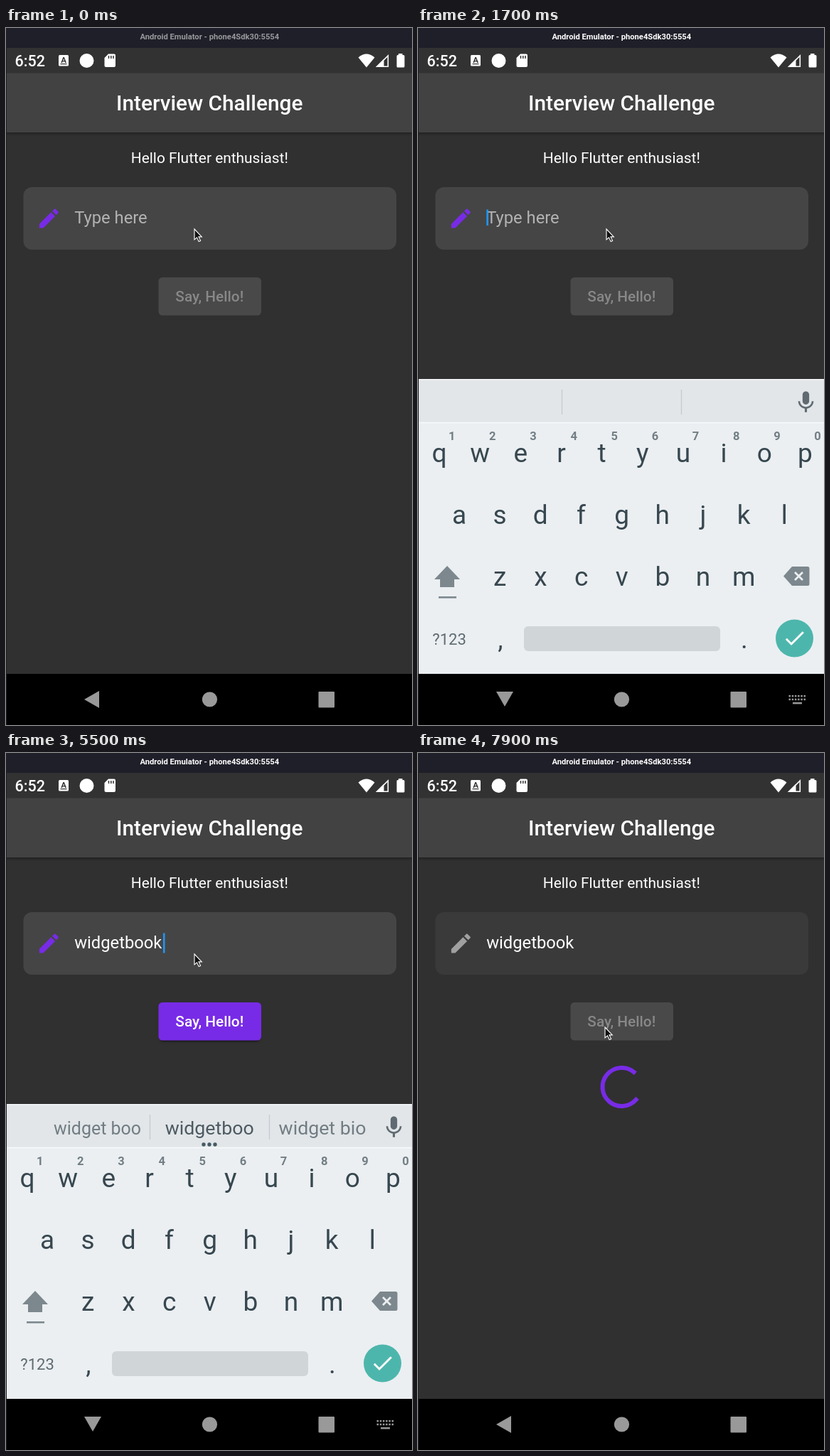
Recreate the animation shown at these times as an HTML page. Size 571x981 px, loop 8 s.

```html
<!DOCTYPE html>
<html lang="en">
<head>
<meta charset="utf-8">
<title>Interview Challenge</title>
<style>
html, body { margin: 0; width: 100%; height: 100%; overflow: hidden; background: #303030; }
svg { display: block; width: 571px; height: 981px; font-family: Roboto, sans-serif; }
.mid { text-anchor: middle; }
.med { font-weight: 500; }
</style>
</head>
<body>
<svg viewBox="0 0 571 981" xmlns="http://www.w3.org/2000/svg">
  <defs>
    <linearGradient id="shade" x2="0" y2="1">
      <stop stop-opacity=".3"/><stop offset="1" stop-opacity="0"/>
    </linearGradient>
    <clipPath id="btnClip"><rect x="214.5" y="351" width="144.5" height="53.5" rx="5.5"/></clipPath>
    <filter id="soft" x="-40%" y="-40%" width="180%" height="180%">
      <feDropShadow dx="0" dy="1.5" stdDeviation="1.5" flood-opacity=".3"/>
    </filter>
  </defs>

  <rect width="571" height="981" fill="#303030"/>

  <!-- window title -->
  <rect width="571" height="28" fill="#1f1f29"/>
  <text id="winTitle" class="mid" x="286.3" y="15.5" font-size="11.2" font-weight="700">Android Emulator - phone4Sdk30:5554</text>

  <!-- status bar -->
  <rect y="28" width="571" height="36" fill="#323232"/>
  <g fill="#fff">
    <text class="med" x="12.5" y="54" font-size="21.5">6:52</text>
    <rect x="74" y="38" width="14" height="15.5" rx="1.5"/>
    <text class="mid" x="81" y="48.5" font-size="11.5" font-weight="700" fill="#323232">A</text>
    <rect x="76.5" y="50" width="9" height="1.2" fill="#323232"/>
    <circle cx="113.5" cy="46" r="10"/>
    <path d="M144 36.5H152Q154 36.5 154 38.5V53Q154 55 152 55H140.5Q138.5 55 138.5 53V42Z"/>
    <path d="M144.5 39V43M147.8 39V43M151 39V43" stroke="#323232" stroke-width="1.5"/>
    <path d="M507 55.5L495.5 41.5Q507 31.5 518.5 41.5Z"/>
    <path d="M520 55L531.5 43.5V55Z"/>
    <path d="M522 54.2H537.3V39Z" fill="none" stroke="#fff" stroke-width="1.6"/>
    <path d="M552 36H557.5V38H559Q560.5 38 560.5 39.5V54Q560.5 55.5 559 55.5H551Q549.5 55.5 549.5 54V39.5Q549.5 38 551 38H552Z"/>
  </g>

  <!-- app bar -->
  <rect y="63.5" width="571" height="83.5" fill="#424242"/>
  <rect y="147" width="571" height="5" fill="url(#shade)"/>
  <text class="mid med" x="286.2" y="116.3" font-size="29.8" fill="#fff">Interview Challenge</text>
  <text class="mid" x="286.3" y="190.3" font-size="20.9" fill="#fff">Hello Flutter enthusiast!</text>

  <!-- input -->
  <rect id="field" x="24.5" y="224" width="524.5" height="88" rx="12"/>
  <path id="pencil" transform="translate(42.3 250) scale(1.5)" d="M3 17.25V21h3.75L17.81 9.94l-3.75-3.75L3 17.25zM20.71 7.04c.39-.39.39-1.02 0-1.41l-2.34-2.34c-.39-.39-1.02-.39-1.41 0l-1.83 1.83 3.75 3.75 1.83-1.83z"/>
  <text id="input" x="96.2" y="275" font-size="23.75"></text>
  <rect id="caret" width="2.6" fill="#2196f3"/>

  <!-- button -->
  <rect id="btnShadow" x="216" y="354" width="141.5" height="52.5" rx="5.5" fill="#000" filter="url(#soft)"/>
  <rect id="btn" x="214.5" y="351" width="144.5" height="53.5" rx="5.5"/>
  <text id="btnText" class="mid med" x="286.3" y="385.3" font-size="20.8">Say, Hello!</text>
  <g clip-path="url(#btnClip)"><circle id="ripple" cx="275" cy="381" fill="#fff"/></g>

  <path id="spinner" fill="none" stroke="#782be6" stroke-width="6" stroke-linecap="square"/>

  <!-- keyboard -->
  <g id="board">
    <rect y="494" width="571" height="491" fill="#ebeff2"/>
    <rect y="494" width="571" height="61" fill="#e2e6e9"/>
    <path d="M0 494.7H571M0 555.5H571" stroke="#f7f9fa" stroke-width="1.5"/>
    <path d="M202.5 509V544M370.5 509V544" stroke="#c6cbce" stroke-width="1.3"/>
    <g id="words" class="mid" font-size="26.7"></g>
    <g id="dots" fill="#455a64">
      <circle cx="278" cy="551" r="2.7"/><circle cx="286" cy="551" r="2.7"/><circle cx="294" cy="551" r="2.7"/>
    </g>
    <path transform="translate(526.9 508.3) scale(1.55)" fill="#5f6b71" d="M12 14c1.66 0 3-1.34 3-3V5c0-1.66-1.34-3-3-3S9 3.34 9 5v6c0 1.66 1.34 3 3 3zm5.3-3c0 3-2.54 5.1-5.3 5.1S6.7 14 6.7 11H5c0 3.41 2.72 6.23 6 6.72V21h2v-3.28c3.28-.48 6-3.3 6-6.72h-1.7z"/>
    <g id="keys" class="mid"></g>
    <g fill="#7c888d">
      <path d="M41 757L59 776H51V787H31V776H23Z"/>
      <rect x="29" y="800" width="25" height="2.6"/>
      <path d="M526 758H548Q550.5 758 550.5 760.5V782.5Q550.5 785 548 785H526L514 771.5Z"/>
    </g>
    <path d="M530 766L541 777M541 766L530 777" stroke="#ebeff2" stroke-width="2.8"/>
    <rect x="149" y="842" width="276" height="35" rx="6" fill="#d0d5d8"/>
    <circle cx="529.5" cy="859" r="26.5" fill="#4db6ac"/>
    <path transform="translate(511.7 840.9) scale(1.484)" fill="#fff" d="M9 16.17L4.83 12l-1.42 1.41L9 19 21 7l-1.41-1.41z"/>
  </g>

  <!-- navigation -->
  <rect id="navBack" y="909" width="571" height="72" fill="#000"/>
  <g id="nav">
    <path id="back" d="M-12 0L9 -12V12Z"/>
    <circle cx="286.5" cy="945" r="10.6"/>
    <rect x="439.5" y="934" width="22.5" height="22.5" rx="1"/>
    <path id="boardIcon"/>
  </g>

  <rect y="28" width="1" height="953" fill="#1c1d24"/>
  <path id="pointer" d="M0 0V14.8L3.5 11.8L6.2 17.5L8.6 16.4L6 10.9H10.3Z" fill="#111" stroke="#fff" stroke-width="1.1"/>
</svg>
<script>
const LOOP = 8000, STEP = 100, KEYBOARD = 486;
const $ = id => document.getElementById(id);
const set = (el, attrs) => { for (const k in attrs) el.setAttribute(k, attrs[k]); };
const clamp = x => Math.min(1, Math.max(0, x));
const smooth = x => (x = clamp(x), x * x * (3 - 2 * x));
const mix = (a, b, k) => `rgb(${a.map((v, i) => Math.round(v + (b[i] - v) * k))})`;
const last = (list, t) => list.filter(e => e[0] <= t).pop();

function add(parent, text, attrs) {
  const el = document.createElementNS('http://www.w3.org/2000/svg', 'text');
  el.textContent = text;
  set(el, attrs);
  parent.appendChild(el);
  return el;
}

// Time of each keystroke and number of letters typed
const WORD = 'widgetbook';
const typed = [[0, 0], [2000, 1], [2100, 2], [2700, 3], [3000, 4], [3200, 5],
  [3600, 6], [4200, 7], [4900, 8], [5100, 9], [5500, 10]];

// Suggestions: time, left, middle, right, then condensing of the outer two
const hints = [
  [0, '', '', ''],
  [2100, 'we', 'w', 'with'],
  [2200, 'will', 'wi', 'with'],
  [2800, 'aid', 'wid', 'wide'],
  [3100, 'wide', 'widg', 'widget'],
  [3300, 'wide', 'widge', 'widgets'],
  [3700, 'widgets', 'widget', 'widget\u2019s'],
  [4300, 'widgets', 'widgetb', 'widget'],
  [5000, 'widget bo', 'widgetbo', 'widget by'],
  [5200, 'widget boo', 'widgetboo', 'widget bio', .935, 1],
  [5600, 'widget book', 'widgetbook', 'widget boom', .84, .8]
];
const slotX = [128.5, 286.2, 445];
const slots = slotX.map((x, i) => add($('words'), '', { fill: i === 1 ? '#4c5a61' : '#717d83' }));

const PITCH = 57.15;
[['qwertyuiop', 30, 611], ['asdfghjkl', 58, 698], ['zxcvbnm', 115.3, 785]].forEach(([row, x, y]) =>
  [...row].forEach((c, i) => add($('keys'), c, { x: x + i * PITCH, y, 'font-size': 37, fill: '#37474f' })));
[...'1234567890'].forEach((c, i) =>
  add($('keys'), c, { x: 47.7 + i * PITCH, y: 579.5, 'font-size': 16.5, 'font-weight': 700, fill: '#727e84' }));
add($('keys'), '?123', { x: 44, y: 867.5, 'font-size': 22, fill: '#5f6b71' });
add($('keys'), ',', { x: 116, y: 873, 'font-size': 37, fill: '#37474f' });
add($('keys'), '.', { x: 459, y: 873, 'font-size': 37, fill: '#37474f' });

let icon = 'M527 949h13v2.5h-13z';
for (let i = 0; i < 6; i++)
  for (const y of [939, 943.7]) icon += `M${521.5 + i * 4.2} ${y}h2.5v2.5h-2.5z`;
$('boardIcon').setAttribute('d', icon);

// cubic-bezier(.4, 0, .2, 1)
function fastOutSlowIn(x) {
  x = clamp(x);
  let lo = 0, hi = 1, u = .5;
  for (let i = 0; i < 24; i++) {
    u = (lo + hi) / 2;
    const bx = 1.2 * u * (1 - u) ** 2 + .6 * u * u * (1 - u) + u ** 3;
    if (bx < x) lo = u; else hi = u;
  }
  return u * u * (3 - 2 * u);
}

function arc(ms) {
  const p = ms / 1333 % 1;
  const head = fastOutSlowIn(p * 2), tail = fastOutSlowIn(p * 2 - 1);
  const a = (-90 + tail * 270 + ms / 2222 * 360 + p * 90) * Math.PI / 180;
  const sweep = Math.max((head - tail) * 1.5 * Math.PI, .01);
  const at = r => `${286.5 + 27 * Math.cos(r)} ${470 + 27 * Math.sin(r)}`;
  return `M${at(a)}A27 27 0 ${sweep > Math.PI ? 1 : 0} 1 ${at(a + sweep)}`;
}

function drawInput(t, sent) {
  const n = last(typed, t)[1], input = $('input');
  input.textContent = n ? WORD.slice(0, n) : 'Type here';
  set(input, { fill: n ? '#fff' : '#b3b3b3' });
  set($('field'), { fill: sent ? '#3a3a3a' : '#454545' });
  set($('pencil'), { fill: sent ? '#a0a0a0' : '#782be6' });

  const off = t < 700 || (t >= 1200 && t < 1700) || (t >= 6100 && t < 6600) || t >= 7100;
  set($('caret'), {
    x: n ? 96.8 + input.getBBox().width : 96.3,
    y: n ? 253.5 : 255.5, height: n ? 28 : 22.5,
    visibility: off ? 'hidden' : 'visible'
  });
}

function drawButton(t, sent) {
  const on = sent ? clamp(1 - (t - 7400) / 250) : clamp((t - 1900) / 300);
  const label = sent ? on * .8 : on;
  set($('btn'), { fill: mix([73, 73, 73], [120, 43, 230], on) });
  set($('btnShadow'), { opacity: on * .35 });
  set($('btnText'), { fill: mix([136, 136, 136], [255, 255, 255], label) });
  const age = (t - 7400) / 100;
  set($('ripple'), { r: 54 + Math.max(0, age) * 34, opacity: sent ? .22 * clamp(1 - age / 3) : 0 });
  set($('spinner'), { d: sent ? arc(t - 7325) : '' });
}

function drawKeyboard(t, sent) {
  const shown = sent ? 1 - smooth((t - 7230) / 375) : t < 700 ? 0 : smooth((t - 630) / 375);
  const sliding = (t >= 700 && t < 1000) || (t >= 7400 && t < 7600);
  set($('board'), {
    transform: `translate(0 ${Math.round(KEYBOARD * (1 - shown))})`,
    visibility: shown > .01 ? 'visible' : 'hidden'
  });
  const hint = last(hints, t);
  slots.forEach((el, i) => {
    el.textContent = hint[i + 1];
    const k = i === 1 ? 1 : hint[i ? 5 : 4] || 1;
    set(el, { transform: `translate(${slotX[i]} 537) scale(${k} 1)` });
  });
  set($('dots'), { visibility: shown > .01 && t >= 2100 ? 'visible' : 'hidden' });

  const turn = sent ? 1 - smooth((t - 7310) / 200) : smooth((t - 800) / 200);
  set($('navBack'), { visibility: sliding ? 'hidden' : 'visible' });
  set($('nav'), { fill: sliding ? '#f7f8f8' : '#999', filter: sliding ? 'url(#soft)' : 'none' });
  set($('back'), { transform: `translate(122 ${945 - 2 * turn}) rotate(${-90 * turn})` });
  set($('boardIcon'), { visibility: t >= 800 && !sent ? 'visible' : 'hidden' });
}

function drawPointer(t) {
  const p = smooth((t - 6400) / 840), q = 1 - p;
  const x = 265 * q * q + 144 * p * q + 263 * p * p;
  const y = 283 * q * q + 670 * p * q + 386 * p * p;
  set($('pointer'), { transform: `translate(${x} ${y})` });
}

function render(now) {
  const t = Math.floor(now % LOOP / STEP) * STEP;
  const sent = t >= 7400;
  set($('winTitle'), { fill: t < 500 ? '#98989c' : '#fff' });
  drawInput(t, sent);
  drawButton(t, sent);
  drawKeyboard(t, sent);
  drawPointer(t);
}

let start;
function tick(now) {
  start ??= now;
  render(Math.max(0, now - start));
  requestAnimationFrame(tick);
}
render(0);
requestAnimationFrame(tick);
</script>
</body>
</html>
```
